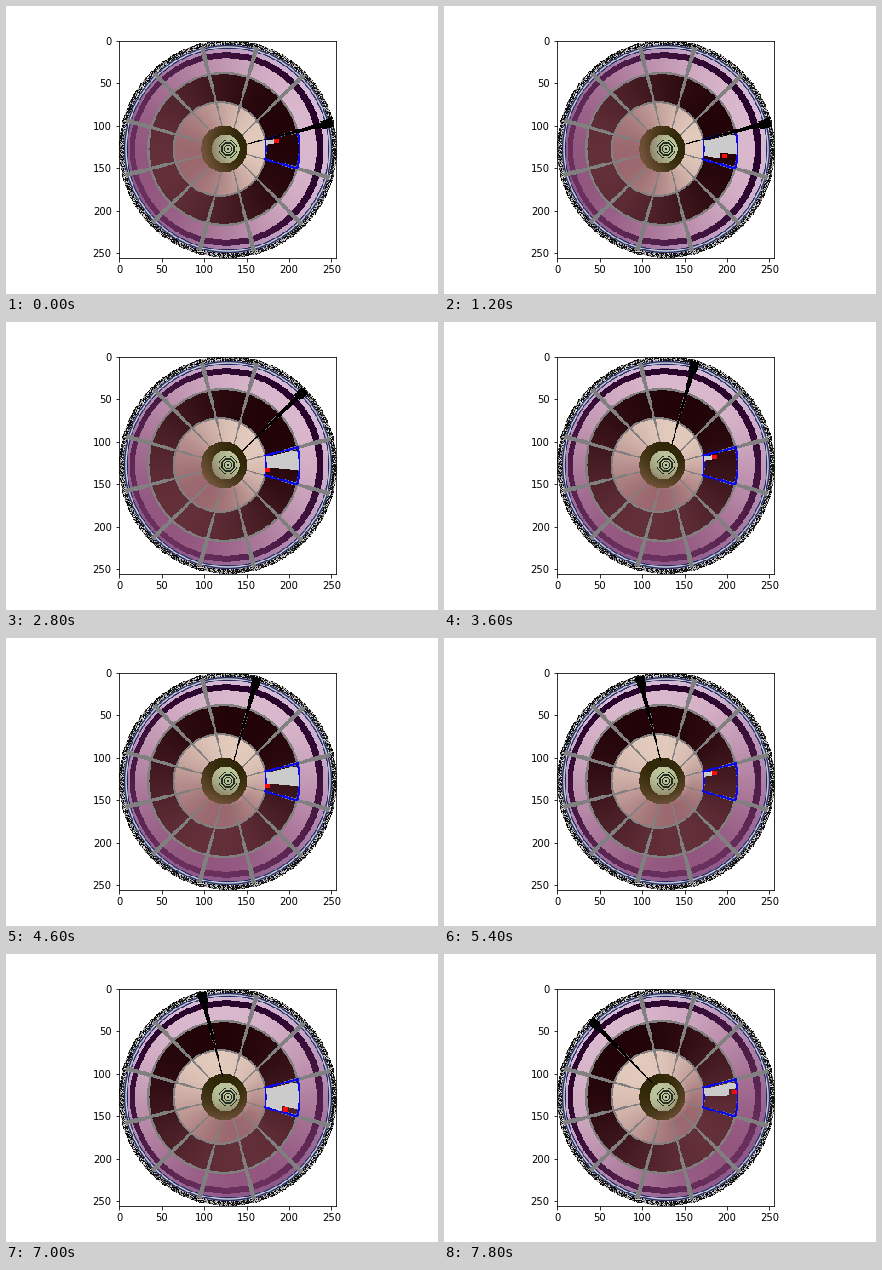
Recreate the animation shown at these times as a matplotlib script. Size 432 by 288 pixels, loop 8000 ms.

```python
import numpy as np
import matplotlib.pyplot as plt
from matplotlib.animation import FuncAnimation
from matplotlib.colors import to_rgb

SIZE = 256
SCALE = 217.44 / SIZE          # stage pixels per image pixel
FRAMES, INTERVAL = 40, 200
SCAN = 9                       # frames spent on one cell
ROWS, COLS = 5, 4
SECTOR, TILT = 30, 14.3        # degrees between spokes, first spoke
ROW_TOP, ROW_STEP = 12.2, 5.5  # raster of the scanned cell, degrees


def rgb(name):
    return np.array(to_rgb(name)) * 255


GRAY, BLUE, RED, FILL = map(rgb, ("#808080", "#0a0aeb", "#ff0a0a", "#cbcbcb"))
RADII = (14, 23, 46, 75.5, 90.5, 96.5)
RINGS = np.array([rgb(c) for c in ("#bcc49c", "#302808", "#e2cabc", "#220408",
                                   "#dab8cd", "#28042c", "#d6bad6")])

yy, xx = (np.mgrid[:SIZE, :SIZE] - (SIZE - 1) / 2) * SCALE
r = np.hypot(xx, yy)
theta = np.arctan2(-yy, xx)
deg = np.degrees(theta)


def edge(radius):
    """Ring outline; the middle rings sit left of the centre."""
    return radius + np.interp(radius, (0, 46, 100), (0, -8, -1)) * np.cos(theta)


def wrap(a):
    return (a + np.pi) % (2 * np.pi) - np.pi


band = sum((r > edge(radius)).astype(int) for radius in RADII)
lit = RINGS[band]
# Away from the seam light rings darken and dark rings brighten
is_light = lit.mean(axis=2, keepdims=True) > 120
drift = np.where(is_light, (-72, -98, -78), (66, 44, 50))
drift = drift * np.clip(r / 25, 0, 1)[..., None]

rng = np.random.default_rng(4)
noise = rng.choice((0, 0, 40, 150, 225), (SIZE, SIZE, 1))
noise = noise * 0.9 + rng.uniform(0, 25, (SIZE, SIZE, 3))
ripple = (0.5 - 0.5 * np.cos(2 * np.pi * (r - 100.6) / 2.6))[..., None]
fringe = rgb("#28285f") * (1 - ripple) + rgb("#c8d2dc") * ripple

inner, outer = edge(46), edge(75.5)
spoke_gap = np.abs((deg - TILT + SECTOR / 2) % SECTOR - SECTOR / 2)
spokes = (spoke_gap < 1.3) & (r > edge(23)) & (r < 105.5)
arcs = (np.abs(r - inner) < 0.9) | (np.abs(r - outer) < 1.1)
core = (r < 9) & (np.sin(r * 2.3) > 0.1)

# The scanned cell: outline and step numbers of its raster
middle = TILT - SECTOR / 2
side = np.abs(deg - middle) - SECTOR / 2
inside = (side < 0) & (r > inner) & (r < outer)
gap = np.minimum(np.abs(np.radians(side) * r),
                 np.minimum(np.abs(r - inner) + 0.3, np.abs(r - outer)))
outline = ((gap < 1) & (np.radians(side) * r < 1)
           & (r > inner - 1) & (r < outer + 1))
row = np.clip((ROW_TOP - deg) // ROW_STEP, 0, ROWS - 1)
col = np.clip((r - inner) / (outer - inner) * COLS // 1, 0, COLS - 1)
step = row * COLS + col


def wheel(seam):
    """The disc, shaded by the angle from its seam."""
    phi = wrap(theta - seam)
    shade = ((1 - np.cos(phi)) / 2)[..., None] ** 1.2
    img = lit + drift * shade
    img[core] = rgb("#222c20")
    img = np.where((r > 100)[..., None], fringe, img)
    img = np.where((r > 104)[..., None], noise, img)
    img[spokes | arcs] = GRAY
    half = 0.018 + 0.006 * (r > 70) + 0.018 * (r > 96)
    return img, (np.abs(phi) < half) & (r > 21) & (r < 107.5)


def picture(i):
    turn, phase = divmod(i, SCAN)
    head = 1 + ROWS * COLS * phase // SCAN
    img, black = wheel(np.radians(TILT + SECTOR * turn))
    img[inside & (deg < ROW_TOP) & (step < head)] = FILL
    img[outline] = BLUE
    img[black] = 0
    head_row, head_col = divmod(head, COLS)
    angle = np.radians(ROW_TOP - (head_row + 0.5) * ROW_STEP)
    reach = 39.2 + 9.8 * head_col
    dx = np.abs(xx - reach * np.cos(angle))
    dy = np.abs(yy + reach * np.sin(angle))
    img[np.maximum(dx, dy) < 2.4] = RED
    img[r > SIZE / 2 * SCALE] = 255
    return np.clip(img, 0, 255).astype(np.uint8)


plt.rcParams["font.family"] = "DejaVu Sans"
plt.rcParams["font.size"] = 10
fig, ax = plt.subplots(figsize=(6, 4), dpi=72, facecolor="white")
fig.subplots_adjust(left=0.125, right=0.9, bottom=0.125, top=0.88)
view = ax.imshow(picture(0), interpolation="nearest")
ax.set_xticks(range(0, 251, 50))
ax.set_yticks(range(0, 251, 50))


def draw(i):
    view.set_data(picture(i))
    return (view,)


anim = FuncAnimation(fig, draw, frames=FRAMES, interval=INTERVAL,
                     init_func=lambda: draw(0), repeat=True, repeat_delay=0)
plt.show()
```
